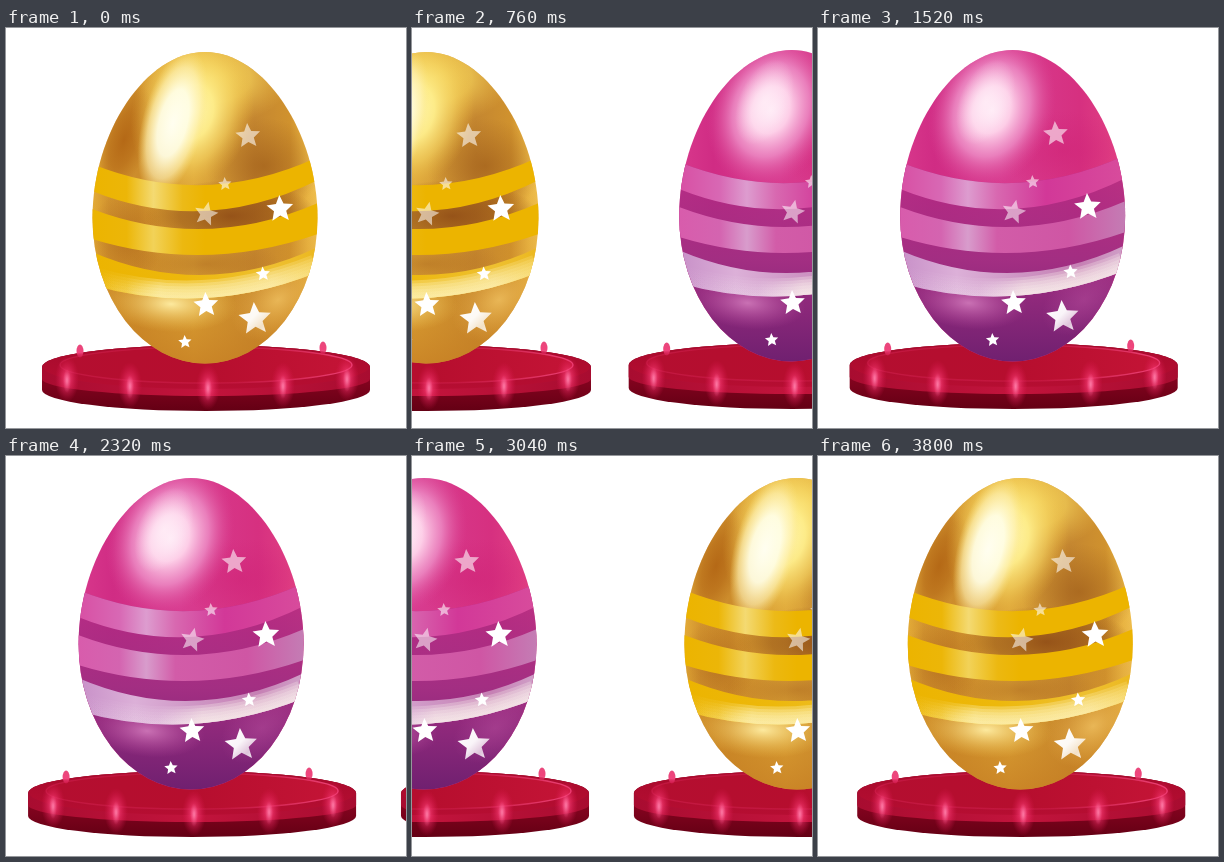
An HTML page with a canvas that plays this animation: 400 px wide and 400 px high, repeating every 4.4 s.

```html
<!DOCTYPE html>
<html lang="en">
<head>
<meta charset="utf-8">
<title>Egg carousel</title>
<style>
html, body { margin: 0; width: 100%; height: 100%; overflow: hidden; background: #fff; }
canvas { display: block; width: 400px; height: 400px; }
</style>
</head>
<body>
<canvas id="stage" width="400" height="400"></canvas>
<script>
const ctx = document.getElementById('stage').getContext('2d');
const LOOP = 4400, STEP = 40, MOVES = 38;

// x, y, radius, rotation in degrees, opacity
const STARS = [
  [242, 108, 13, -4, .58], [219, 156, 7, -4, .58], [200, 186, 12.5, 12, .55],
  [274, 181, 14, -3, 1], [257, 246, 7.5, -4, 1], [200, 277, 13, -3, 1],
  [249, 291, 17, -4, .96], [179, 314, 7, -4, 1]
];

// Stripe edges: y at left, middle and right
const STRIPES = [
  [[136, 157, 129], [163, 183, 152]],
  [[181, 201, 175], [211, 227, 206]],
  [[224, 247, 219], [257, 270, 244]]
];

const GOLD = {
  body: [[0, '#e4ac38'], [.07, '#d29430'], [.2, '#cc8c2c'], [.45, '#e0aa3c'], [.72, '#c48630'], [.88, '#d0922e'], [.96, '#eab644'], [1, '#f0c050']],
  low: [[0, 'rgba(200,130,30,0)'], [.5, 'rgba(204,136,36,.2)'], [1, 'rgba(198,126,34,.8)']],
  glows: [
    [205, 50, 80, 48, 0, [[0, 'rgba(248,220,100,.95)'], [.5, 'rgba(244,208,88,.7)'], [1, 'rgba(236,186,70,0)']]],
    [258, 138, 58, 48, 0, [[0, 'rgba(160,94,26,.7)'], [1, 'rgba(160,94,26,0)']]],
    [118, 112, 24, 58, .3, [[0, 'rgba(176,98,18,.85)'], [.5, 'rgba(176,98,18,.55)'], [1, 'rgba(176,98,18,0)']]],
    [186, 84, 60, 80, .25, [[0, '#fff6b0'], [.35, 'rgba(254,238,140,.95)'], [.65, 'rgba(246,214,100,.6)'], [1, 'rgba(230,176,56,0)']]],
    [167, 95, 31, 76, .25, [[0, '#fffef0'], [.45, 'rgba(255,254,232,.9)'], [.75, 'rgba(254,242,186,.6)'], [1, 'rgba(250,226,130,0)']]],
    [225, 188, 86, 36, 0, [[0, 'rgba(140,72,20,.85)'], [.6, 'rgba(150,84,22,.6)'], [1, 'rgba(150,84,22,0)']]],
    [120, 210, 38, 46, 0, [[0, 'rgba(168,96,24,.55)'], [1, 'rgba(168,96,24,0)']]],
    [200, 236, 76, 24, 0, [[0, 'rgba(172,104,30,.55)'], [1, 'rgba(172,104,30,0)']]],
    [165, 276, 66, 28, .05, [[0, 'rgba(255,238,164,.95)'], [1, 'rgba(240,196,80,0)']]],
    [272, 272, 52, 36, -.6, [[0, 'rgba(238,190,94,.85)'], [1, 'rgba(230,172,70,0)']]]
  ],
  bands: [
    [[0, '#ecb400'], [.15, '#ecb608'], [.27, '#f4da72'], [.4, '#ecba18'], [.5, '#ecb400'], [1, '#ecb400']],
    [[0, '#ecb400'], [.15, '#ecb608'], [.27, '#f2d258'], [.4, '#ecb810'], [.5, '#ecb400'], [1, '#ecb400']],
    [[0, '#ecb400'], [.4, '#edb80c'], [.8, '#eec030'], [1, '#ecb820']]
  ],
  sheen: [[0, 'rgba(250,232,150,0)'], [.15, 'rgba(250,232,150,.1)'], [.3, 'rgba(252,238,170,.36)'], [.8, 'rgba(252,236,170,.34)'], [1, 'rgba(250,226,130,.25)']]
};

const PINK = {
  body: [[0, '#d8388c'], [.15, '#d02c84'], [.45, '#d83c90'], [.8, '#d63080'], [1, '#e44484']],
  low: [[0, 'rgba(168,40,130,.7)'], [.45, 'rgba(160,46,130,.95)'], [1, '#702070']],
  glows: [
    [250, 125, 66, 40, 0, [[0, 'rgba(208,36,120,.6)'], [1, 'rgba(208,36,120,0)']]],
    [178, 84, 62, 80, .35, [[0, '#fff0f8'], [.3, 'rgba(255,214,236,.95)'], [.6, 'rgba(240,150,204,.75)'], [1, 'rgba(220,70,150,0)']]],
    [172, 76, 26, 45, .4, [[0, 'rgba(255,236,246,.9)'], [1, 'rgba(255,230,244,0)']]],
    [155, 277, 58, 26, .1, [[0, 'rgba(212,126,190,.85)'], [1, 'rgba(190,80,160,0)']]],
    [270, 274, 46, 30, -.6, [[0, 'rgba(176,72,152,.6)'], [1, 'rgba(176,72,152,0)']]]
  ],
  bands: [
    [[0, '#d850a4'], [.18, '#d868b4'], [.3, '#dd9ccf'], [.43, '#d868b0'], [.65, '#d23898'], [1, '#d84c9c']],
    [[0, '#d85cac'], [.18, '#d464b0'], [.3, '#d89ccc'], [.43, '#d25ca8'], [.75, '#cf56a4'], [1, '#c47cb4']],
    [[0, '#c890c8'], [.25, '#dcb0d8'], [.5, '#cf98c6'], [.8, '#c680b4'], [1, '#d0a0c8']]
  ],
  sheen: [[0, 'rgba(240,220,236,0)'], [.35, 'rgba(240,220,236,.1)'], [.55, 'rgba(246,232,232,.34)'], [1, 'rgba(246,232,232,.3)']]
};

function addStops(g, stops) {
  for (const [p, c] of stops) g.addColorStop(p, c);
  return g;
}

function linear(x0, y0, x1, y1, stops) {
  return addStops(ctx.createLinearGradient(x0, y0, x1, y1), stops);
}

function glow(x, y, rx, ry, rot, stops) {
  ctx.save();
  ctx.translate(x, y);
  ctx.rotate(rot);
  ctx.scale(rx, ry);
  ctx.fillStyle = addStops(ctx.createRadialGradient(0, 0, 0, 0, 0, 1), stops);
  ctx.beginPath();
  ctx.arc(0, 0, 1, 0, 7);
  ctx.fill();
  ctx.restore();
}

function oval(x, y, rx, ry) {
  ctx.beginPath();
  ctx.ellipse(x, y, rx, ry, 0, 0, Math.PI * 2);
}

// Disc with straight sides between two levels
function drum(top, rTop, bottom, rBottom, fill) {
  ctx.beginPath();
  ctx.ellipse(200, top, 164, rTop, 0, Math.PI, Math.PI * 2);
  ctx.ellipse(200, bottom, 164, rBottom, 0, 0, Math.PI);
  ctx.closePath();
  ctx.fillStyle = fill;
  ctx.fill();
}

function base() {
  drum(339, 22, 362, 21, linear(0, 350, 0, 383, [[0, '#860420'], [1, '#640014']]));
  drum(339, 22, 351, 17, linear(36, 0, 364, 0, [[0, '#a80c30'], [.5, '#c2143c'], [1, '#a80c30']]));
  oval(200, 339, 163, 22);
  ctx.fillStyle = linear(0, 317, 0, 361, [[0, '#a80a2c'], [1, '#b60e32']]);
  ctx.fill();
  oval(200, 337, 146, 18);
  ctx.fillStyle = linear(54, 0, 346, 0, [[0, '#b40e30'], [.5, '#b60e2e'], [1, '#c41436']]);
  ctx.fill();
  ctx.lineWidth = 1.4;
  ctx.strokeStyle = linear(54, 0, 346, 0, [[0, 'rgba(214,36,84,.45)'], [.6, 'rgba(214,36,84,.4)'], [1, '#ee4478']]);
  ctx.stroke();

  const soft = [[0, 'rgba(255,96,148,.9)'], [.35, 'rgba(244,56,112,.62)'], [1, 'rgba(220,20,80,0)']];
  for (const [x, y] of [[61, 351], [124, 357], [202, 359], [277, 357], [341, 350]]) {
    glow(x, y, 12, 23, 0, soft);
    glow(x, y + 2, 4, 12, 0, [[0, 'rgba(255,140,178,.7)'], [1, 'rgba(255,90,146,0)']]);
  }
  for (const [x, y] of [[74, 323], [317, 320]]) {
    oval(x, y, 3.5, 6.5);
    ctx.fillStyle = linear(0, y - 7, 0, y + 7, [[0, '#e8487c'], [.6, '#f0447c'], [1, 'rgba(216,24,80,.5)']]);
    ctx.fill();
  }
}

function eggPath() {
  ctx.beginPath();
  ctx.moveTo(86.5, 190);
  ctx.bezierCurveTo(86.5, 104, 140, 24, 199, 24);
  ctx.bezierCurveTo(258, 24, 311.5, 104, 311.5, 190);
  ctx.ellipse(199, 190, 112.5, 145.5, 0, 0, Math.PI);
  ctx.closePath();
}

// Quadratic through the three edge heights
function edge([a, m, b], back) {
  const c = 2 * m - (a + b) / 2;
  if (back) {
    ctx.lineTo(312, b);
    ctx.quadraticCurveTo(199, c, 86, a);
  } else {
    ctx.moveTo(86, a);
    ctx.quadraticCurveTo(199, c, 312, b);
  }
}

function bandPath([top, bottom]) {
  ctx.beginPath();
  edge(top);
  edge(bottom, true);
  ctx.closePath();
}

function star([x, y, r, deg, alpha]) {
  ctx.beginPath();
  for (let i = 0; i < 10; i++) {
    const a = (deg - 90 + i * 36) * Math.PI / 180;
    const d = i % 2 ? r * .46 : r;
    ctx.lineTo(x + d * Math.cos(a), y + d * Math.sin(a));
  }
  ctx.closePath();
  ctx.fillStyle = r > 15
    ? linear(x - r, y - r, x + r, y + r, [[0, '#fff'], [.45, 'rgba(255,255,255,.95)'], [.7, 'rgba(255,255,255,.72)'], [1, '#fff']])
    : `rgba(255,255,255,${alpha})`;
  ctx.fill();
}

// Soft light rising from the lower edge of a stripe
function sheen(stripe, stops) {
  ctx.save();
  bandPath(stripe);
  ctx.clip();
  ctx.beginPath();
  edge(stripe[1]);
  ctx.strokeStyle = linear(87, 0, 311, 0, stops);
  for (let w = 6; w <= 36; w += 6) {
    ctx.lineWidth = w;
    ctx.stroke();
  }
  ctx.restore();
}

function egg(skin) {
  ctx.save();
  eggPath();
  ctx.clip();
  ctx.fillStyle = linear(87, 0, 311, 0, skin.body);
  ctx.fillRect(86, 23, 226, 314);

  // Deeper tone below the first stripe
  ctx.beginPath();
  edge(STRIPES[0][0]);
  ctx.lineTo(312, 337);
  ctx.lineTo(86, 337);
  ctx.closePath();
  ctx.fillStyle = linear(0, 150, 0, 335, skin.low);
  ctx.fill();

  for (const g of skin.glows) glow(...g);
  STRIPES.forEach((s, i) => {
    bandPath(s);
    ctx.fillStyle = linear(87, 0, 311, 0, skin.bands[i]);
    ctx.fill();
  });
  sheen(STRIPES[2], skin.sheen);
  ctx.restore();
  STARS.forEach(star);
}

function stand(skin, dx, dy) {
  if (dx < -370 || dx > 370) return;
  ctx.save();
  ctx.translate(dx, dy);
  base();
  egg(skin);
  ctx.restore();
}

function draw(now) {
  const t = now % LOOP;
  const count = start => Math.min(MOVES, Math.max(0, Math.floor((t - start) / STEP)));
  ctx.fillStyle = '#fff';
  ctx.fillRect(0, 0, 400, 400);
  if (t < 2320) {
    const x = -9.737 * count(0);
    stand(GOLD, x, 0);
    stand(PINK, 365.7 + x, -2);
  } else {
    const x = -9.615 * count(2280);
    stand(PINK, x - 4.3, -2);
    stand(GOLD, 368.6 + x, -2);
  }
}

function tick() {
  draw(performance.now());
  requestAnimationFrame(tick);
}
tick();
</script>
</body>
</html>
```
